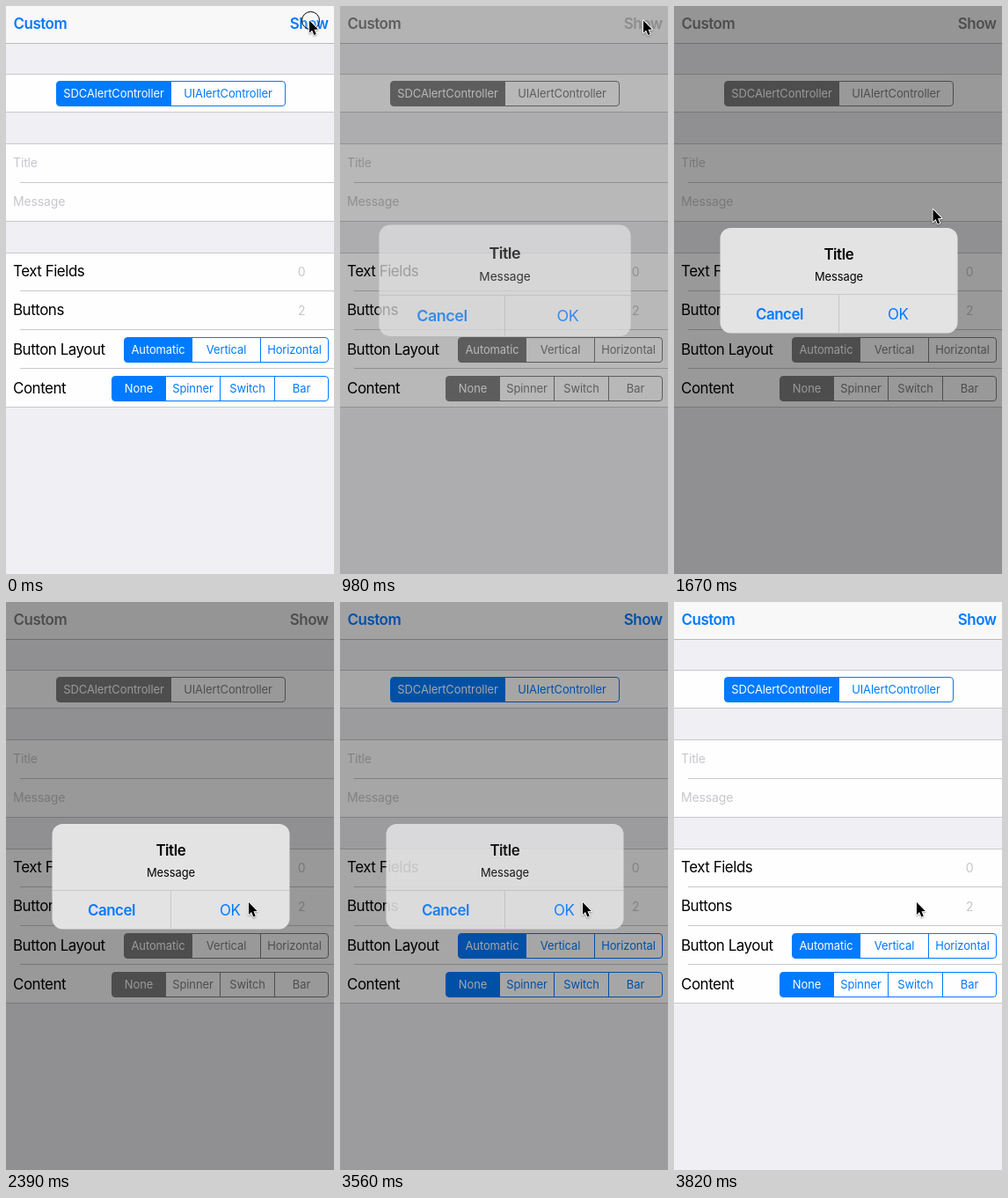
Animation, 373 px wide and 645 px high, one loop 4.89 s. Source, as an HTML page with a canvas:

```html
<!DOCTYPE html>
<html lang="en">
<head>
<meta charset="utf-8">
<title>Alert demo</title>
<style>
  html, body { margin: 0; width: 100%; height: 100%; overflow: hidden; background: #efeff4; }
  canvas { display: block; width: 373px; height: 645px; }
</style>
</head>
<body>
<canvas id="stage"></canvas>
<script>
const W = 373, H = 645, LOOP = 4890;
const FONT = 'Inter, Roboto, "Liberation Sans", sans-serif';
const BLUE = '#007aff', GRAY = '#808080', HAIR = '#c8c7cc', FAINT = '#c7c7cd';
const dpr = window.devicePixelRatio || 1;

// Moments at which the screen refreshes.
const TICKS = [0, 90, 710, 890, 980, 1060, 1150, 1240, 1320,
  1490, 1580, 1670, 1760, 1850, 1940, 2030, 2120, 2210, 2300, 2390,
  3470, 3560, 3650, 3730, 3820];

// Pointer path: time, x, y.
const PATH = [
  [1400, 346.5, 16.5], [1490, 339, 48], [1580, 316, 142], [1670, 296, 231],
  [1760, 281, 272], [1850, 272.5, 292], [1940, 270.5, 298],
  [2030, 271, 302], [2120, 272.5, 312], [2210, 275, 325],
  [2300, 277, 336], [2390, 277.5, 341]
];

// Fade of the alert when dismissed.
const FADE = [[3470, 1], [3560, 0.87], [3650, 0.43], [3730, 0.12], [3820, 0]];

function makeLayer(canvas) {
  canvas.width = Math.round(W * dpr);
  canvas.height = Math.round(H * dpr);
  const c = canvas.getContext('2d');
  c.scale(dpr, dpr);
  return c;
}

const ctx = makeLayer(document.getElementById('stage'));
const layer = makeLayer(document.createElement('canvas'));

const clamp = v => Math.max(0, Math.min(1, v));

function track(keys, t) {
  if (t <= keys[0][0]) return keys[0].slice(1);
  for (let i = 1; i < keys.length; i++) {
    const a = keys[i - 1], b = keys[i];
    if (t <= b[0]) {
      const k = (t - a[0]) / (b[0] - a[0]);
      return a.slice(1).map((v, j) => v + (b[j + 1] - v) * k);
    }
  }
  return keys[keys.length - 1].slice(1);
}

function shown(t) {
  if (t < 860 || t >= 3820) return 0;
  if (t >= 3470) return track(FADE, t)[0];
  if (t >= 1320) return 1;
  const k = (t - 860) * 0.0203;
  return 1 - (1 + k) * Math.exp(-k);
}

function text(c, str, x, y, size, color, align = 'left', weight = 400) {
  c.font = `${weight} ${size}px ${FONT}`;
  c.letterSpacing = (size > 16 ? -0.44 : size > 13.5 ? -0.15 : -0.08) + 'px';
  c.textAlign = align;
  c.fillStyle = color;
  c.fillText(str, x, y);
}

function box(c, x, y, w, h, color) {
  c.fillStyle = color;
  c.fillRect(x, y, w, h);
}

function group(top, bottom, rows) {
  box(ctx, 0, top, W, bottom - top, '#fefefe');
  box(ctx, 0, top, W, 1, HAIR);
  box(ctx, 0, bottom - 1, W, 1, HAIR);
  rows.forEach(y => box(ctx, 16, y, W - 16, 1, HAIR));
}

// Segmented control; the first segment is selected.
function segments(edges, top, labels, tint) {
  const x = edges[0], w = edges[edges.length - 1] - x, h = 28;
  ctx.save();
  ctx.beginPath();
  ctx.roundRect(x, top, w, h, 4);
  ctx.clip();
  box(ctx, x, top, edges[1] - x, h, tint);
  ctx.restore();
  ctx.strokeStyle = tint;
  ctx.lineWidth = 1;
  ctx.beginPath();
  ctx.roundRect(x, top, w, h, 3.5);
  edges.slice(1, -1).forEach(e => {
    ctx.moveTo(e, top);
    ctx.lineTo(e, top + h);
  });
  ctx.stroke();
  labels.forEach((s, i) => text(ctx, s, (edges[i] + edges[i + 1]) / 2, top + 18.7,
    12.93, i ? tint : '#fff', 'center'));
}

function drawPage(t) {
  const tint = t >= 890 && t < 3560 ? GRAY : BLUE;
  box(ctx, 0, 0, W, H, '#efeff4');
  box(ctx, 0, 0, W, 42, '#f8f8f9');
  box(ctx, 0, 42, W, 1, '#b9b9bc');
  text(ctx, 'Custom', 8.5, 26, 16.9, tint, 'left', 600);
  ctx.globalAlpha = t < 710 ? 1 : clamp(0.25 + Math.max(0, t - 910) / 350);
  text(ctx, 'Show', 366.5, 26, 16.9, tint, 'right', 600);
  ctx.globalAlpha = 1;

  group(77, 121, []);
  group(156, 245, [200]);
  group(280, 456, [323, 367, 411]);

  text(ctx, 'Title', 8, 183, 14, FAINT);
  text(ctx, 'Message', 8, 227, 14, FAINT);
  ['Text Fields', 'Buttons', 'Button Layout', 'Content'].forEach((s, i) =>
    text(ctx, s, 8, [306.5, 350.5, 395.5, 439.5][i], 16.9, '#000'));
  text(ctx, '0', 340.5, 306.5, 14, FAINT, 'right');
  text(ctx, '2', 340.5, 350.5, 14, FAINT, 'right');

  segments([57.5, 187.5, 317.5], 85.5, ['SDCAlertController', 'UIAlertController'], tint);
  segments([134.5, 211.5, 289.5, 366.5], 376.5, ['Automatic', 'Vertical', 'Horizontal'], tint);
  segments([120.5, 181.5, 243.5, 305.5, 366.5], 420.5, ['None', 'Spinner', 'Switch', 'Bar'], tint);
}

function drawAlert(scale, pressed) {
  const c = layer;
  c.clearRect(0, 0, W, H);
  c.save();
  c.translate(187.5, 311.75);
  c.scale(scale, scale);
  c.translate(-187.5, -311.75);
  c.beginPath();
  c.roundRect(52.5, 252, 270, 119.5, 12);
  c.fillStyle = '#e3e3e4';
  c.fill();
  c.save();
  c.clip();
  if (pressed) box(c, 188, 328, 135, 44, '#d6d6d7');
  box(c, 52.5, 327, 270, 1, '#c8c8ca');
  box(c, 187, 328, 1, 44, '#c8c8ca');
  c.restore();
  text(c, 'Title', 187.3, 288, 16.9, '#000', 'center', 600);
  text(c, 'Message', 187.5, 312, 12.93, '#000', 'center');
  text(c, 'Cancel', 120, 355.5, 16.9, BLUE, 'center', 600);
  text(c, 'OK', 254.8, 355.5, 16.9, BLUE, 'center');
  c.restore();
}

function drawPointer(x, y, ring) {
  if (ring) {
    ctx.beginPath();
    ctx.arc(x, y, 10, 0, Math.PI * 2);
    ctx.fillStyle = 'rgba(255,255,255,0.2)';
    ctx.fill();
    ctx.strokeStyle = '#000';
    ctx.lineWidth = 1;
    ctx.stroke();
  }
  ctx.save();
  ctx.translate(x - 1.5, y);
  ctx.beginPath();
  [[0, 0], [0, 14], [3.1, 11.1], [5.4, 16.4], [7.7, 15.4], [5.5, 10.3], [9.8, 10]]
    .forEach(p => ctx.lineTo(...p));
  ctx.closePath();
  ctx.lineJoin = 'round';
  ctx.lineWidth = 1.8;
  ctx.strokeStyle = '#fff';
  ctx.shadowColor = 'rgba(0,0,0,0.35)';
  ctx.shadowBlur = 2 * dpr;
  ctx.shadowOffsetY = dpr;
  ctx.stroke();
  ctx.shadowColor = 'transparent';
  ctx.fillStyle = '#000';
  ctx.fill();
  ctx.restore();
}

function render(time) {
  const t = TICKS.filter(k => k <= time).pop();
  const p = shown(t);
  const tapOk = t >= 3470 && t < 3560;
  const tapShow = t < 90 || (t >= 710 && t < 890);

  drawPage(t);
  if (p > 0) {
    box(ctx, 0, 0, W, H, `rgba(0,0,0,${0.4 * p})`);
    drawAlert(t < 1320 ? 1.2 - 0.2 * p : 1, tapOk);
    ctx.globalAlpha = p;
    ctx.drawImage(layer.canvas, 0, 0, W, H);
    ctx.globalAlpha = 1;
  }
  const [x, y] = track(PATH, t);
  drawPointer(x, y, tapOk || tapShow);
}

const start = performance.now();
function loop() {
  render((performance.now() - start) % LOOP);
  requestAnimationFrame(loop);
}
loop();
</script>
</body>
</html>
```
